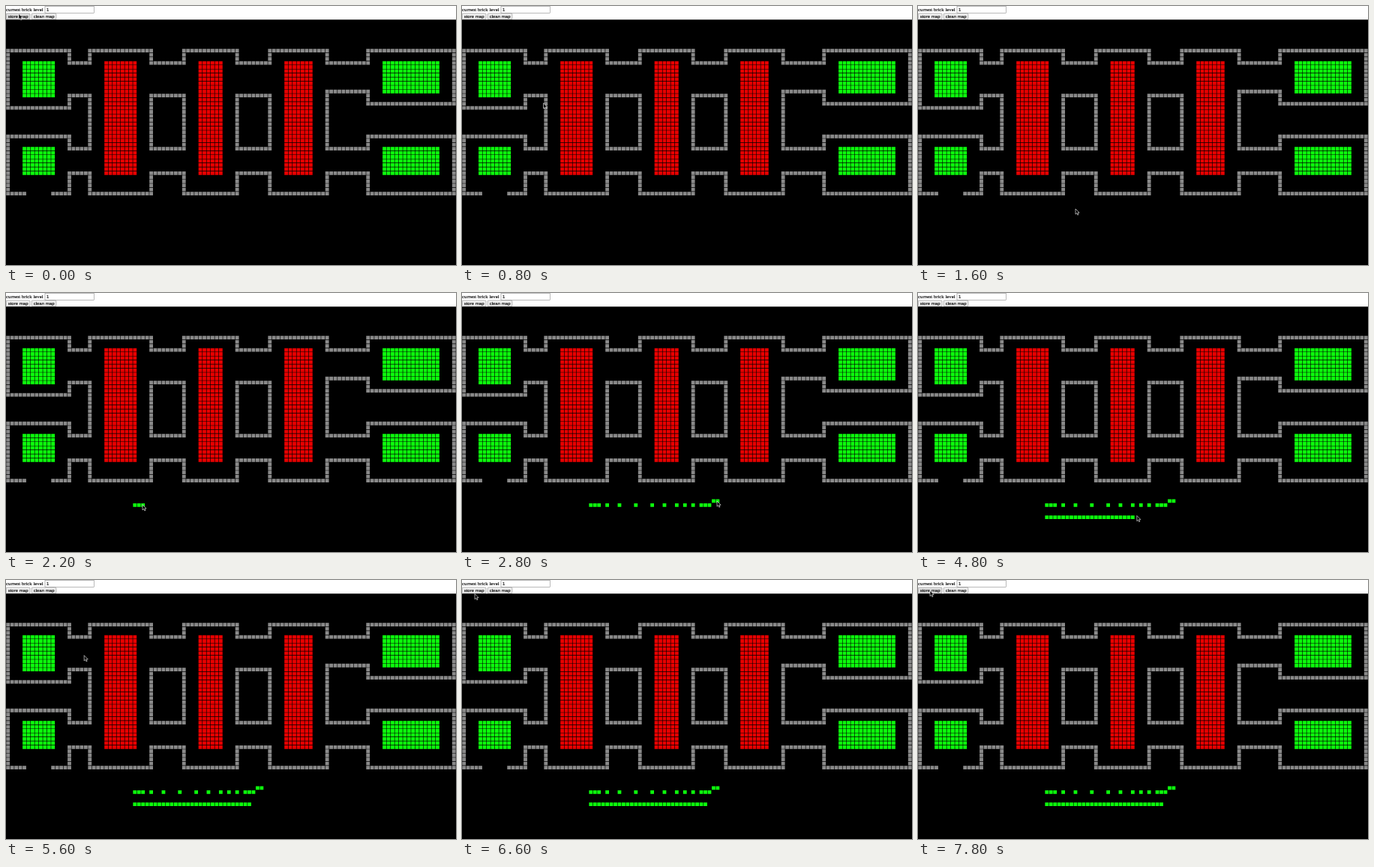
An HTML page that plays this animation: 600x346 px, repeating every 8000 ms.

```html
<!DOCTYPE html>
<html lang="en">
<head>
<meta charset="utf-8">
<title>Brick map editor</title>
<style>
  html, body { margin: 0; width: 100%; height: 100%; overflow: hidden; background: #fff; }
  svg { display: block; width: 600px; height: 346px; }
  text { stroke: #000; stroke-width: .12; }
  .label { font: 6.78px "Liberation Serif", serif; }
  .ui { font: 6.06px "Liberation Sans", sans-serif; }
  .box { fill: #fff; stroke: #767676; stroke-width: .5; }
  .button { fill: #efefef; }
</style>
</head>
<body>
<svg viewBox="0 0 600 346">
  <rect width="600" height="346" fill="#fff"/>
  <text class="label" x="0" y="7.2">current brick level</text>
  <rect class="box" x="52" y=".7" width="65.3" height="8.6"/>
  <text class="ui" x="54" y="7.2">1</text>
  <rect class="box button" id="store" x=".3" y="9.9" width="31.7" height="8" rx="1.2"/>
  <text class="ui" x="16.1" y="16" text-anchor="middle">store map</text>
  <rect class="box button" x="34.3" y="9.9" width="32.6" height="8" rx="1.2"/>
  <text class="ui" x="50.6" y="16" text-anchor="middle">clean map</text>
  <rect y="18.2" width="600" height="327.8" fill="#000"/>
  <path id="walls" fill="#8a8a8a"/>
  <path id="reds" fill="#e80000"/>
  <path id="greens" fill="#0cff0c"/>
  <path id="drawn" fill="#0cff0c"/>
  <path id="cursor" d="M0 0V7.2L1.7 5.7L2.8 8.2L4 7.7L2.9 5.2H5.1Z" fill="#000" stroke="#fff" stroke-width=".6"/>
</svg>
<script>
const LOOP = 8000, STEP = 100;
const COLS = 110, BOTTOM = 42;
const PITCH = 600 / COLS, TOP = 18.8, SIZE = 4.8, INSET = 0.3;
const $ = id => document.getElementById(id);

const brick = (col, row) =>
  `M${(col * PITCH + INSET).toFixed(2)} ${(TOP + row * PITCH + INSET).toFixed(2)}h${SIZE}v${SIZE}h${-SIZE}z`;

// Bricks inside a rectangle (corners included) that pass the test
function bricks(c0, r0, c1, r1, test = () => true) {
  let d = '';
  for (let r = r0; r <= r1; r++)
    for (let c = c0; c <= c1; c++) if (test(c, r)) d += brick(c, r);
  return d;
}

// Rooms and corridors as outer rectangles: left, top, right, bottom
const halls = [[20, 7, 35, BOTTOM], [43, 7, 56, BOTTOM], [64, 7, 78, BOTTOM]];
const corners = [[0, 7, 15, 21], [0, 28, 15, BOTTOM], [88, 7, 109, 20], [88, 28, 109, BOTTOM]];
const corridors = [[15, 10, 78, 18], [78, 10, 88, 17], [15, 31, 88, 37]];
const floor = [...halls, ...corners, ...corridors];

const inside = (c, r) =>
  floor.some(([c0, r0, c1, r1]) => c >= c0 && c <= c1 && r >= r0 && r <= r1);
const around = [-1, 0, 1];
const isDoor = (c, r) => r === BOTTOM && c > 4 && c < 11;
const isWall = (c, r) => inside(c, r) && !isDoor(c, r) &&
  around.some(i => around.some(j => !inside(c + i, r + j)));

const pool = ([c0, r0, c1, r1]) =>
  bricks(c0 + 4, r0 + 3, c1 - 4, r1 - (r1 === BOTTOM ? 5 : 3));

$('walls').setAttribute('d', bricks(0, 0, COLS - 1, BOTTOM, isWall));
$('reds').setAttribute('d', halls.map(pool).join(''));
$('greens').setAttribute('d', corners.map(pool).join(''));

// Columns hit by a quick stroke: the gaps swell, then die away
const quick = [31];
for (let i = 1; i <= 15; i++) {
  const u = i / 5.5;
  quick.push(quick[i - 1] + Math.round(0.7 + 3.1 * u ** 4 * Math.exp(4 - 4 * u)));
}

// Cursor moves: start, end, x, y
const home = [17, 10.5];
const moves = [
  [500, 1100, 200, 249], [1200, 1600, 210, 271], [1600, 2100, 171, 283],
  [2100, 2800, 340, 278], [2900, 3400, 153, 296], [3500, 3800, 169.5, 299],
  [3900, 5200, 327.5, 297], [5200, 5800, 26, 32], [5900, 6600, 17, 18.4],
  [6600, 7000, 17, 15.5], [7200, 7800, 16, 14.3]
];

function cursorAt(t) {
  let [x, y] = home;
  for (const [start, end, tx, ty] of moves) {
    const u = Math.min(1, Math.max(0, (t - start) / (end - start)));
    const k = u * u * (3 - 2 * u);
    x += (tx - x) * k;
    y += (ty - y) * k;
  }
  return [x, y];
}

function render(now) {
  const t = Math.floor(now % LOOP / STEP) * STEP;
  let [x, y] = cursorAt(t), d = '';

  if (t >= 2100) {
    const hits = quick.slice(0, 1 + Math.floor(15 * Math.min(1, (t - 2100) / 700)));
    d += hits.map(c => brick(c, c > 60 ? 47 : 48)).join('');
    if (t < 2800) x = hits[hits.length - 1] * PITCH + 2;
  }
  if (t >= 3800) {
    const [tip] = cursorAt(Math.min(t, 5200));
    d += bricks(31, 51, Math.max(31, Math.floor((tip - 4) / PITCH)), 51);
  }

  const hover = x < 32 && y > 9.9 && y < 18;
  $('store').style.fill = hover ? '#dedede' : '#efefef';
  $('drawn').setAttribute('d', d);
  $('cursor').setAttribute('transform', `translate(${x.toFixed(2)} ${y.toFixed(2)})`);
}

const start = performance.now();
function tick() {
  render(performance.now() - start);
  requestAnimationFrame(tick);
}
tick();
</script>
</body>
</html>
```
